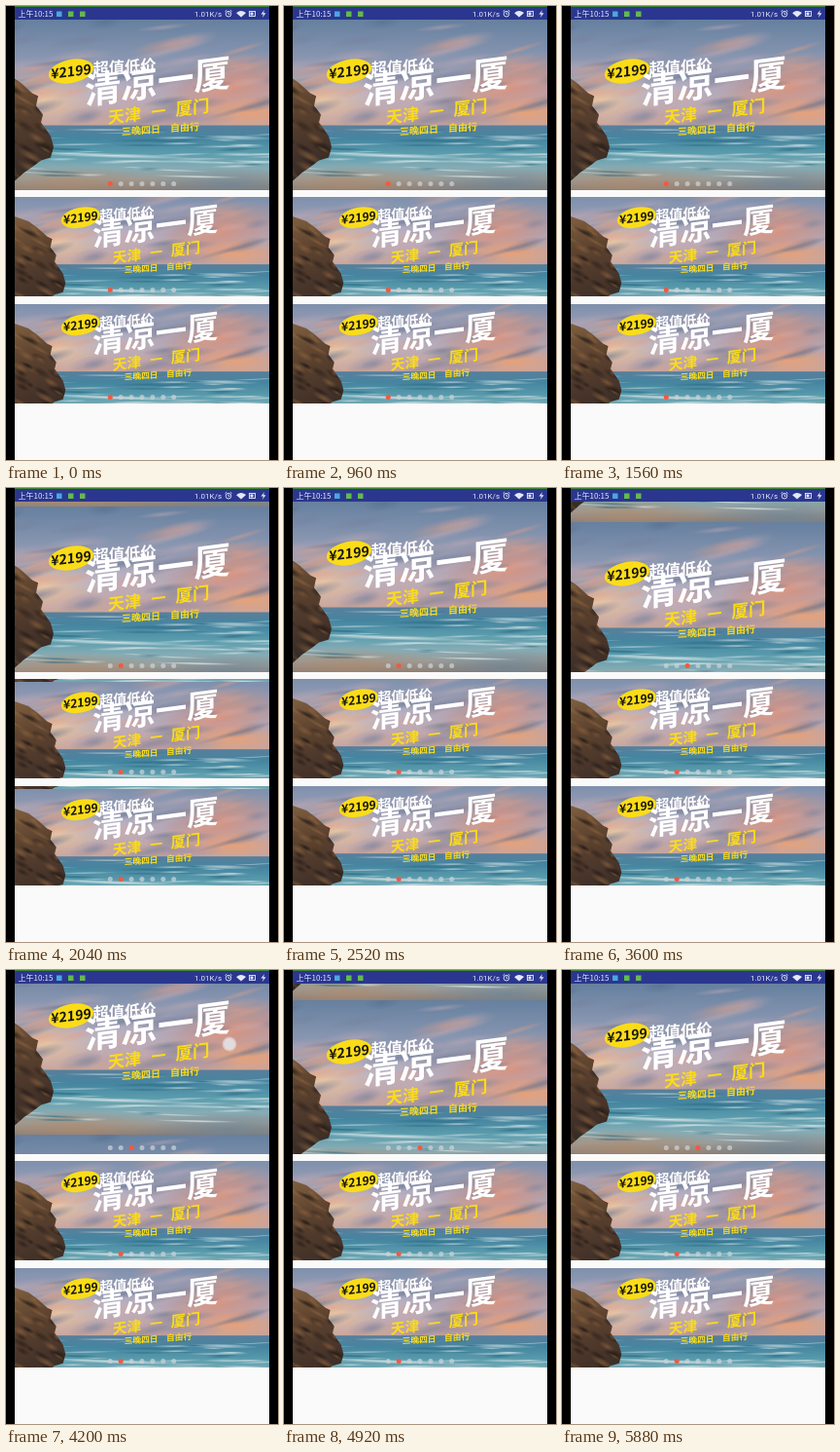
Write an HTML page with a canvas that moves like this. It is 280 px wide and 466 px high and loops after 6000 ms.

```html
<!DOCTYPE html>
<html lang="zh-CN">
<head>
<meta charset="utf-8">
<style>
html, body { margin: 0; width: 100%; height: 100%; overflow: hidden; background: #000; }
canvas { display: block; }
</style>
</head>
<body>
<canvas id="stage" width="280" height="466"></canvas>
<script>
const ctx = document.getElementById('stage').getContext('2d');
const LOOP = 6000, STEP = 120, SETTLE = 800;
const CJK = '"Noto Sans CJK SC", "Noto Sans CJK", sans-serif';
const LEFT = 9, WIDTH = 262;
const AUTO = 1640, DRAG1 = 3000, DROP1 = 3360, DRAG2 = 4020, DROP2 = 4660;

function seeded(seed) {
  return () => (seed = (seed * 16807) % 2147483647) / 2147483647;
}

function fade(c, x0, y0, x1, y1, stops) {
  const g = c.createLinearGradient(x0, y0, x1, y1);
  stops.forEach(([at, color]) => g.addColorStop(at, color));
  return g;
}

function glow(c, x, y, rx, ry, rgb, alpha, tilt = 0) {
  c.save();
  c.translate(x, y);
  c.rotate(tilt);
  c.scale(rx, ry);
  const g = c.createRadialGradient(0, 0, 0, 0, 0, 1);
  g.addColorStop(0, `rgba(${rgb},${alpha})`);
  g.addColorStop(1, `rgba(${rgb},0)`);
  c.fillStyle = g;
  c.fillRect(-1, -1, 2, 2);
  c.restore();
}

function paintSky(c) {
  const rnd = seeded(77);
  c.fillStyle = fade(c, 0, -88, 0, 22, [
    [0, '#65809f'], [0.35, '#8795b0'], [0.7, '#b3a5b2'], [1, '#c9a59b']]);
  c.fillRect(-152, -88, 304, 110);
  glow(c, -100, -6, 65, 28, '246,205,160', 0.75);
  glow(c, -30, -14, 70, 24, '190,190,212', 0.6);
  glow(c, 95, -20, 75, 32, '232,138,104', 0.65, -0.2);
  glow(c, 110, 8, 60, 16, '245,160,105', 0.7);
  glow(c, 40, 14, 60, 10, '148,134,160', 0.6);
  const tints = ['84,106,140', '196,170,180', '116,128,158', '224,158,134'];
  for (let i = 0; i < 56; i++) {
    const x = rnd() * 300 - 150, y = rnd() * 104 - 88;
    glow(c, x, y, 16 + rnd() * 36, 3 + rnd() * 6, tints[i % 4], 0.5, -0.3 + rnd() * 0.2);
  }
}

function paintSea(c) {
  const rnd = seeded(31);
  c.fillStyle = fade(c, 0, 21, 0, 88, [
    [0, '#587f9b'], [0.2, '#4585a0'], [0.45, '#5c9eae'],
    [0.65, '#86acb5'], [0.82, '#9c9c98'], [1, '#8c7c72']]);
  c.fillRect(-152, 21, 304, 67);
  glow(c, -75, 80, 90, 19, '176,139,108', 0.65);
  glow(c, 90, 82, 85, 18, '104,132,151', 0.7);
  for (let i = 0; i < 60; i++) {
    const y = 25 + rnd() * 50;
    glow(c, rnd() * 290 - 140, y, 12 + rnd() * 34, 0.8 + rnd() * 1.4,
      i % 3 ? '222,233,234' : '38,102,126', 0.6, rnd() * 0.08 - 0.04);
  }
  glow(c, -30, 52, 85, 2.6, '240,243,241', 0.8, 0.03);
}

function paintCliff(c) {
  const edge = [[-152, -36], [-135, -30], [-124, -22], [-113, -12], [-107, -9], [-109, 1],
    [-102, 10], [-104, 18], [-94, 32], [-91, 43], [-94, 54], [-104, 57],
    [-112, 63], [-122, 70], [-131, 78], [-152, 88]];
  const rnd = seeded(9);
  c.save();
  c.beginPath();
  edge.forEach(([x, y]) => c.lineTo(x, y));
  c.closePath();
  c.fillStyle = fade(c, -152, -36, -112, 85, [
    [0, '#80603f'], [0.3, '#604530'], [0.65, '#49352a'], [1, '#2d2723']]);
  c.fill();
  c.clip();
  for (let i = 0; i < 42; i++) {
    glow(c, -152 + rnd() * 62, -30 + rnd() * 112, 5 + rnd() * 13, 2 + rnd() * 3,
      i % 2 ? '27,21,19' : '146,103,63', 0.6, 0.5);
  }
  c.restore();
}

// Slanted lettering: the baseline climbs by `rise` per pixel.
function slogan(c, text, x, y, size, color, rise, weight = 900) {
  c.save();
  c.transform(1, -rise, 0, 1, x, y);
  c.font = `${weight} ${size}px ${CJK}`;
  c.textAlign = 'center';
  c.textBaseline = 'alphabetic';
  c.fillStyle = color;
  c.fillText(text, 0, size * 0.37);
  c.restore();
}

function paintSlogans(c) {
  const yellow = '#fbdc18';
  c.fillStyle = yellow;
  c.beginPath();
  c.ellipse(-73, -34.5, 23.5, 12, -0.2, 0, Math.PI * 2);
  c.fill();
  slogan(c, '¥2199', -73, -34.5, 14, '#17150e', 0.12);
  slogan(c, '超值低价', -18, -39, 16.3, '#fff', 0.06);
  slogan(c, '清凉一厦', 16, -24, 37.5, '#fff', 0.13);
  slogan(c, '天津', -18, 11, 17, yellow, 0.12);
  slogan(c, '一', 17, 6.5, 15, yellow, 0.12);
  slogan(c, '厦门', 52, 2.5, 17.5, yellow, 0.12);
  slogan(c, '三晚四日', -1, 26, 10, yellow, 0.06, 700);
  slogan(c, '自由行', 44, 23, 10, yellow, 0.06, 700);
}

// The picture fills the banner, centred and cropped.
function makePicture(height, scale) {
  const canvas = document.createElement('canvas');
  canvas.width = WIDTH;
  canvas.height = height;
  const c = canvas.getContext('2d');
  c.translate(WIDTH / 2, height / 2);
  c.scale(scale, scale);
  paintSky(c);
  paintSea(c);
  paintCliff(c);
  paintSlogans(c);
  return canvas;
}

const large = makePicture(175, 1), small = makePicture(102, 0.865);

const lerp = (a, b, p) => a + (b - a) * Math.min(1, Math.max(0, p));
const span = (t, a, b) => (t - a) / (b - a);
const settle = (t, start, from, to) =>
  lerp(from, to, 1 - Math.pow(1 - Math.min(1, Math.max(0, (t - start) / SETTLE)), 5));

const autoPage = t => settle(t, AUTO, 0, 1);

function draggedPage(t) {
  if (t < DRAG1) return autoPage(t);
  if (t < DROP1) return lerp(1, 1.28, span(t, DRAG1, DROP1));
  if (t < DRAG2) return settle(t, DROP1, 1.28, 2);
  if (t < 4200) return lerp(2, 2.114, span(t, DRAG2, 4200));
  if (t < DROP2) return lerp(2.114, 2.32, span(t, 4200, DROP2));
  return settle(t, DROP2, 2.32, 3);
}

function dot(x, y, r, color) {
  ctx.fillStyle = color;
  ctx.beginPath();
  ctx.arc(x, y, r, 0, Math.PI * 2);
  ctx.fill();
}

function drawBanner(picture, y, page, active) {
  const h = picture.height;
  const shift = Math.round((page - Math.floor(page)) * h);
  ctx.save();
  ctx.beginPath();
  ctx.rect(LEFT, y, WIDTH, h);
  ctx.clip();
  ctx.drawImage(picture, LEFT, y - shift);
  if (shift) ctx.drawImage(picture, LEFT, y - shift + h);
  ctx.restore();
  for (let i = 0; i < 7; i++) {
    dot(107.3 + i * 10.9, y + h - 6.5, 2.5, i === active ? '#f7573f' : 'rgba(205,211,215,0.72)');
  }
}

function drawTouch(t) {
  let x, y;
  if (t >= DRAG1 && t < DROP1) {
    const p = span(t, DRAG1, DROP1);
    x = lerp(222, 226, p);
    y = lerp(124, 68, p);
  } else if (t >= DRAG2 && t < DROP2) {
    x = 230;
    y = t < 4200 ? lerp(100, 76, span(t, DRAG2, 4200)) : lerp(76, 36, span(t, 4200, DROP2));
  } else return;
  dot(x, y, 7.5, 'rgba(225,225,230,0.55)');
  dot(x, y, 6, 'rgba(235,235,238,0.6)');
}

function line(...points) {
  ctx.beginPath();
  points.forEach(([x, y]) => ctx.lineTo(x, y));
  ctx.stroke();
}

function drawStatusBar() {
  ctx.fillStyle = '#2b378f';
  ctx.fillRect(LEFT, 0, WIDTH, 14);
  ctx.fillStyle = '#3c8430';
  ctx.fillRect(LEFT, 0, WIDTH, 1);
  ctx.fillStyle = '#e4e7f5';
  ctx.textBaseline = 'alphabetic';
  ctx.textAlign = 'left';
  ctx.font = `8px ${CJK}`;
  ctx.fillText('上午10:15', 12.5, 11);
  ctx.font = '8px Roboto, sans-serif';
  ctx.fillText('1.01K/s', 194, 11);
  [[52, '#4aa7df'], [64, '#5fbd4a'], [76, '#67b84f']].forEach(([x, color]) => {
    ctx.fillStyle = color;
    ctx.fillRect(x, 5.5, 5.5, 5.5);
  });

  ctx.strokeStyle = ctx.fillStyle = '#e4e7f5';
  ctx.lineWidth = 0.9;
  ctx.beginPath();
  ctx.arc(229, 8.2, 2.8, 0, Math.PI * 2);
  ctx.stroke();
  line([229, 6.5], [229, 8.4], [230.4, 8.4]);
  line([225.5, 5.6], [227.2, 4.2]);
  line([230.8, 4.2], [232.5, 5.6]);

  ctx.beginPath();
  ctx.moveTo(242, 11.5);
  ctx.arc(242, 11.5, 6.5, -Math.PI * 0.77, -Math.PI * 0.23);
  ctx.fill();
  ctx.strokeRect(250.5, 5.5, 6, 5);
  ctx.fillRect(251.5, 6.5, 3, 3);
  ctx.beginPath();
  [[266, 4], [262.5, 8.5], [265, 8.5], [263.8, 12], [267.5, 7.2], [265, 7.2]]
    .forEach(([x, y]) => ctx.lineTo(x, y));
  ctx.fill();
}

function draw(time) {
  const t = Math.floor((time % LOOP) / STEP) * STEP;
  const autoIndex = t < AUTO ? 0 : 1;
  const index = t < DROP1 ? autoIndex : t < DROP2 ? 2 : 3;
  ctx.fillStyle = '#000';
  ctx.fillRect(0, 0, 280, 466);
  ctx.fillStyle = '#fafafa';
  ctx.fillRect(LEFT, 14, WIDTH, 452);
  drawBanner(large, 14, draggedPage(t), index);
  drawBanner(small, 196, autoPage(t), autoIndex);
  drawBanner(small, 306, autoPage(t), autoIndex);
  drawStatusBar();
  drawTouch(t);
}

const start = performance.now();
function tick() {
  draw(performance.now() - start);
  requestAnimationFrame(tick);
}
tick();
</script>
</body>
</html>
```
